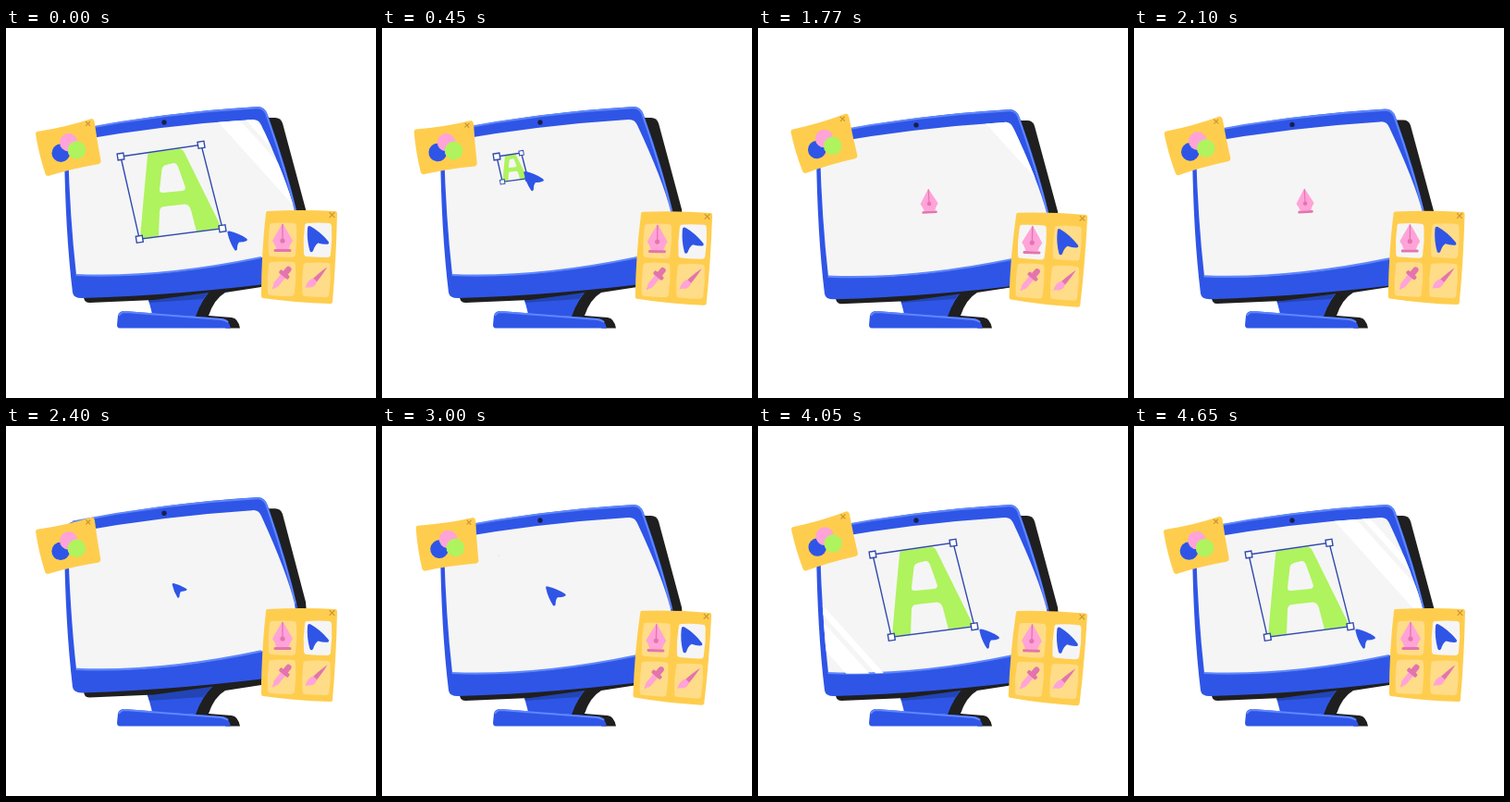
An HTML page with a canvas for the animation above (4680 ms loop, 400 px wide and 400 px high).

```html
<!DOCTYPE html>
<html>
<head>
<meta charset="utf-8">
<style>
  html, body { margin: 0; width: 100%; height: 100%; overflow: hidden; background: #fff; }
  canvas { display: block; }
</style>
</head>
<body>
<canvas id="stage" width="400" height="400"></canvas>
<script>
const c = document.getElementById('stage').getContext('2d');
const LOOP = 4680, TAU = Math.PI * 2;
const BLUE = '#2f55e7', LIGHT = '#5f87fc', NAVY = '#2244b5', BLACK = '#1f1f1f', LINE = '#3049ae',
  YELLOW = '#ffcd4e', CELL = '#ffdc88', PALE = '#f5f5f5', PINK = '#ffa3d8', ROSE = '#e374ae',
  GREEN = '#aff35e', BROWN = '#cd9632';

const fill = (d, color, rule) => { c.fillStyle = color; c.fill(new Path2D(d), rule); };
const line = (d, color, width) => {
  c.strokeStyle = color; c.lineWidth = width; c.stroke(new Path2D(d));
};
const disc = (x, y, r, color) => {
  c.fillStyle = color; c.beginPath(); c.arc(x, y, r, 0, TAU); c.fill();
};
const at = (x, y, angle, scale, draw) => {
  c.save(); c.translate(x, y); c.rotate(angle * Math.PI / 180); c.scale(scale, scale);
  draw(); c.restore();
};
const mix = (a, b, k) => a + (b - a) * k;
const ease = k => (1 - Math.cos(Math.PI * k)) / 2;

// Eased value through [time, value] pairs
function track(t, keys) {
  if (t <= keys[0][0]) return keys[0][1];
  for (let i = 1; i < keys.length; i++) {
    const [t0, v0] = keys[i - 1], [t1, v1] = keys[i];
    if (t < t1) return mix(v0, v1, ease((t - t0) / (t1 - t0)));
  }
  return keys[keys.length - 1][1];
}

// Tip of the arrow is at 0,0
const arrow = () => fill('M3 .3Q0 -1 0 2.5Q-1 15 2.5 27Q4 29.5 6 27Q8 20.5 11.5 18.5Q17 20.3 22 19.7Q24 18.7 22.3 16.5Q13.5 6 3 .3Z', BLUE);

function pen() {
  fill('M0 -18Q6 -8 11 1Q8 5 6.5 10H-6.5Q-8 5 -11 1Q-6 -8 0 -18Z', PINK);
  line('M0 -17V1', ROSE, 1.3);
  disc(0, 1, 2.6, ROSE);
  fill('M-8 10H8Q9.5 10 9.5 11.5T8 13H-8Q-9.5 13 -9.5 11.5T-8 10Z', ROSE);
}

function dropper() {
  fill('M-3.4 -4H3.4V10Q3 13 1.5 14L1 17H-1L-1.5 14Q-3 13 -3.4 10Z', PINK);
  fill('M-7 -6Q-7 -7.5 -5 -7.5H-3.5V-13Q-3.5 -16.5 0 -16.5T3.5 -13V-7.5H5Q7 -7.5 7 -6V-4Q7 -2.5 5 -2.5H-5Q-7 -2.5 -7 -4Z', ROSE);
}

function brush() {
  fill('M0 -19Q2 -10 3 3H-3Q-2 -10 0 -19Z', ROSE);
  fill('M-3 2H3Q6 9 1 13Q-1 14 -2 17Q-7 8 -3 2Z', PINK);
}

const cross = (x, y, r) =>
  line(`M${x - r} ${y - r}L${x + r} ${y + r}M${x + r} ${y - r}L${x - r} ${y + r}`, BROWN, 1.2);

function stand() {
  fill('M204 312Q211 292 222 270H276V280L237 286Q225 293 219 311L244 313Q251 314 253 324.5H238Z', BLACK);
  fill('M151 282L158 309L205 312Q212 292 224 281V270H151Z', BLUE);
  fill('M151 270H224V281Q217 287 213 293L155 297L151 286Z', NAVY);
  fill('M121 311Q122 306 128 306L234 314Q241 315 243 324.6H123Q120 324 120 321Z', BLUE);
  line('M122 311Q124 307 129 307L232 315Q238 316 240 318', LIGHT, 2);
}

const SCREEN = 'M67 130Q67 123 74 122Q170 105 266 99Q273 98 276 105Q304 165 312 198L318 238Q310 244 276 248Q165 272 76 267Q69 205 67 130Z';

function monitor() {
  fill('M270 97H291Q297 97 299 103L324 196Q328 230 322 272L160 294L90 297Q84 297 84 290Z', BLACK);
  fill('M63 130Q63 113 72 111Q170 91 272 85Q280 85 283 94Q304 152 316 205L320 265Q320 272 312 273Q190 289 82 292Q73 292 72 286Q64 220 63 130Z', BLUE);
  line('M72 111Q170 92 271 86.3Q278 86 281 92Q302 152 313 198', LIGHT, 2);
  fill(SCREEN, PALE);
  line('M75.5 267Q165 271 276 248', LIGHT, 2.2);
  disc(171, 102, 2.7, '#17204e');
}

function glare(left) {
  const band = (x, w) => fill(`M${x - 18} 85H${x - 18 + w}L${x + w + 153} 275H${x + 153}Z`, '#fff');
  c.save();
  c.clip(new Path2D(SCREEN));
  band(left, 25);
  band(left + 32, 9);
  c.restore();
}

function letterBox(s) {
  if (s < .02) return disc(126, 140, .6, '#cfd4c8');
  const p = (x, y) => [124 + x * s, 139 + y * s];
  const corners = [p(0, 0), p(87, -12.7), p(110, 77.7), p(20.3, 89.3)];
  at(124, 139, 0, s, () => fill(
    'M32 -4L64 -8.5Q67 -8 69 -4L109 77L82 81L76 58Q74 51 69 51.5L47 54Q42 54.5 42 60L41 86L21 88.5Q25 40 29 0Q29 -4 32 -4Z' +
    'M49 9Q45 10 44.5 14L42 36Q42 39.5 46 39L67 37Q71 36 69.5 32L62 11Q60 6.5 57 7Z', GREEN, 'evenodd'));
  line('M' + corners.join('L') + 'Z', LINE, 1.4);
  corners.forEach(([x, y], i) => at(x, y, -9, i ? mix(3.8, 7, s) : 6.8, () => {
    c.fillStyle = '#fff'; c.fillRect(-.5, -.5, 1, 1);
    c.strokeStyle = LINE; c.lineWidth = .2; c.strokeRect(-.5, -.5, 1, 1);
  }));
}

function cursor(t, s) {
  const away = track(t, [[660, 0], [1020, 1], [2990, 1], [3260, 0]]);
  const x = mix(115 + 124 * s, 177, away);
  const y = mix(127 + 93 * s, 174, away);
  const size = track(t, [[1080, 1], [1190, 0], [2230, 0], [2490, 1]]);
  const nib = track(t, [[1170, 0], [1330, 1.1], [1430, 1], [2120, 1], [2250, 0]]);
  if (size > 0) at(x + 9, y + 9, -17, .8 * size, () => { c.translate(-7.5, -14); arrow(); });
  if (nib > 0) at(185, 187, -3, .87 * nib, pen);
}

function palette(p) {
  const a = TAU * (p - .04);
  at(71 - 3.5 * Math.cos(a), 126.5 + 3 * Math.cos(TAU * (p - .1)), 1 + 4.1 * Math.sin(a), 1, () => {
    fill('M-34 -17Q-2 -22 25 -31Q27 -31 28 -28Q31 -6 35 15Q35 17 33 18Q4 23 -22 31Q-24 31 -25 29Q-32 8 -35.5 -14Q-36 -16 -34 -17Z', YELLOW);
    disc(-8.3, 6.2, 9.8, BLUE);
    disc(.2, -5.3, 9.8, PINK);
    disc(8.8, 3, 9.8, GREEN);
    cross(21, -25.5, 2.4);
  });
}

function toolbox(p, penActive) {
  const k = Math.cos(TAU * (p - .02));
  const cell = (x, y, active, draw) => {
    at(x, y, 0, 1, () => {
      fill('M-11 -18Q2 -19 12 -18Q15 -18 15 -14Q16 0 14 15Q14 19 10 19Q0 19 -12 18Q-15 18 -15 14Q-16 0 -14 -15Q-14 -18 -11 -18Z', active ? PALE : CELL);
      draw();
    });
  };
  at(314 + 3 * k, 249.5 - 2.5 * k, 1.6 - 1.6 * k, 1, () => {
    fill('M-34 -49Q3 -51 39 -49Q41 -49 41 -46Q40 3 36 49Q36 51 33 51Q-4 50 -39 45Q-41 45 -41 42Q-41 -3 -36 -47Q-36 -49 -34 -49Z', YELLOW);
    cell(-18, -18, penActive, pen);
    cell(20, -18, !penActive, () => at(-11, -15, 0, 1, arrow));
    cell(-19, 24, false, () => at(0, -1, 39, .9, dropper));
    cell(18.5, 25, false, () => at(0, -1, 43, .92, brush));
    cross(35.5, -45, 2.8);
  });
}

function draw(t) {
  const p = t % (LOOP / 2) / (LOOP / 2);
  const drop = track(t, [[1600, 0], [1800, 3.2], [2050, 3.2], [2380, -8.2], [2680, 0]]);
  const size = track(t, [[100, 1], [660, 0], [3250, 0], [3980, 1]]);
  c.fillStyle = '#fff';
  c.fillRect(0, 0, 400, 400);
  stand();
  c.save();
  c.translate(0, 1.232 * drop);
  c.scale(1, 1 - .0027 * drop);
  monitor();
  glare(232 + .45 * (t > LOOP / 2 ? t - LOOP : t));
  glare(250 + .45 * (t - 1770));
  if (t < 1180 || t > 2700) letterBox(size);
  cursor(t, size);
  c.restore();
  palette(p);
  toolbox(p, t > 1180 && t < 2240);
}

function tick() {
  draw(performance.now() % LOOP);
  requestAnimationFrame(tick);
}
tick();
</script>
</body>
</html>
```
